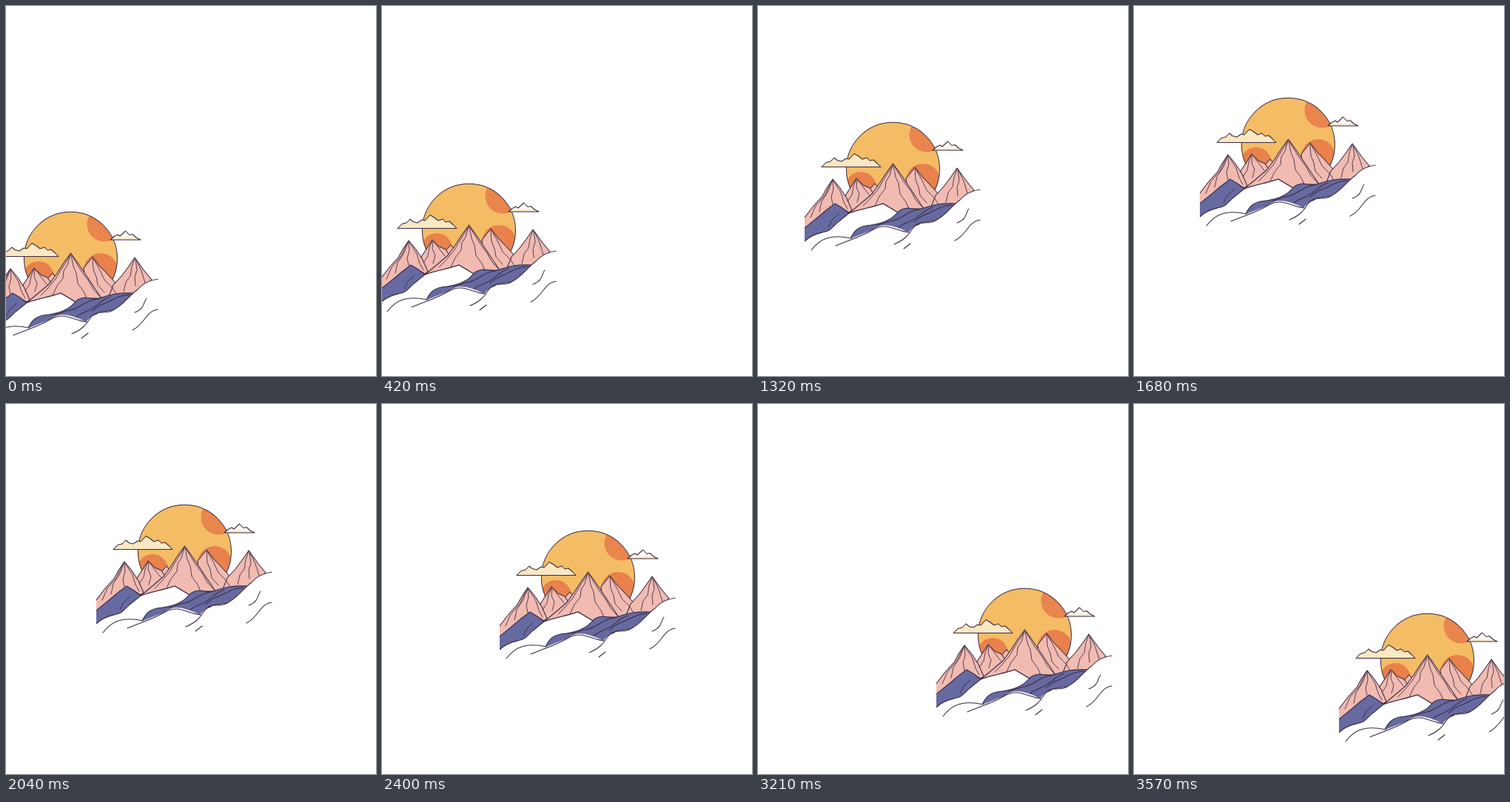
An HTML page that plays this animation: 500 px wide and 500 px high, repeating every 3600 ms.

```html
<!DOCTYPE html>
<html lang="en">
<head>
<meta charset="utf-8">
<title>Mountain sunrise</title>
<style>
  html, body { margin: 0; height: 100%; overflow: hidden; background: #fff; }
  svg { display: block; width: 100vw; height: 100vh; }
  .ink { fill: none; stroke: #3b2a42; stroke-width: 1.05; stroke-linejoin: round; stroke-linecap: round; }
  .thin { stroke-width: .85; }
  .pink { fill: #f1bbb1; }
  .blue { fill: #666aa0; stroke: #352d50; }
  .snow { fill: #fff; }
  .cream { fill: #f9e8c2; }
  .mist { fill: url(#mist); }
  .spot { fill: #e8814b; }
</style>
</head>
<body>
<svg viewBox="0 0 500 500">
  <defs>
    <clipPath id="frame"><path d="M89 120H326.5V300H89Z"/></clipPath>
    <clipPath id="disc"><circle cx="208.4" cy="187.3" r="63"/></clipPath>
    <pattern id="grain" width="4" height="4" patternUnits="userSpaceOnUse">
      <path d="M0 0h1v1h-1zM2 2h1v1h-1z" fill="#f3b168" opacity=".7"/>
    </pattern>
    <linearGradient id="mist" x2="0" y2="1">
      <stop offset=".45" stop-color="#fff"/><stop offset="1" stop-color="#f9e5bd"/>
    </linearGradient>
  </defs>
  <g id="scene"><g clip-path="url(#frame)">
    <!-- sun -->
    <circle cx="208.4" cy="187.3" r="63" fill="#f4bc65"/>
    <g clip-path="url(#disc)" class="spot">
      <circle cx="254" cy="141" r="23.5"/>
      <circle cx="254" cy="141" r="23.5" fill="url(#grain)"/>
      <circle cx="249" cy="203" r="23"/>
      <circle cx="165" cy="212" r="21"/>
    </g>
    <circle cx="208.4" cy="187.3" r="63" class="ink"/>

    <!-- clouds -->
    <path class="ink cream" d="M112 184.5L118 178.5 124 177 129 172 133 175.5 139 177 145 173 149 174 156 166.5 162 170 167 174 173 172 177 176 182 175 187 179.5 192 184.5Z"/>
    <path class="ink mist" d="M262 162L267 157.5 272 155 275 157 282.5 150 288 155.5 292 154.5 297 159 303 162Z"/>

    <!-- peaks, back to front -->
    <g class="ink pink">
      <path d="M184 207L170 222 160 250H200L190 214Z"/>
      <path d="M159 200L152 211 144 223 146 246H176L183 222 177 213 168 209Z"/>
      <path d="M238 185L226 200 230 241H278L275 228 267 218 255 205 248 198Z"/>
      <path d="M295 186L286 199 277 211 266 223 260 238H293L318 216 308 204Z"/>
      <path d="M127 201L119 213 113 224 102 236 95 245 85 258V271L130 235 149 246 153 243 146 227 137 213Z"/>
      <path d="M208.5 180L199 193 190 207 180 221 166 233 149 247 195 234 215 246 226 241H250L242 229 230 211 220 196Z"/>
    </g>
    <g class="ink thin">
      <path d="M127 202L121 217 112 231 109 245M125 204L117 222 104 237 97 253M127 202L128 214 125 225 127 235M128 203L138 219 142 232 147 241"/>
      <path d="M159 201L155 211 153 222 147 231M160 202L159 212 163 221 160 232M161 202L169 213 176 222"/>
      <path d="M208 182L204 196 199 204 198 214 190 224 184 237M207 184L195 203 188 215 177 228 168 237M209 182L212 198 216 207 218 221 226 232 230 241M210 183L222 203 233 218 239 229 249 240"/>
      <path d="M238 187L239 202 243 212 245 223 254 233M239 187L248 203 254 216 264 226 270 235"/>
      <path d="M295 187L291 198 289 211 283 219 280 232M296 188L298 203 295 212 296 224M297 189L304 204 309 220"/>
    </g>

    <!-- blue slopes and snow -->
    <path class="snow" d="M149 247L195 234 215 246 212 262 150 285 89 290Z"/>
    <path class="ink" d="M149 247C160 242 182 239 195 234L215 246"/>
    <path class="ink blue" d="M85 270L105 254 118 243 130 234 140 240 149 247 133 260C125 268 122 272 112 273Q99 276 85 288Z"/>
    <path class="ink thin" d="M135 248L126 256 121 266"/>
    <path class="ink blue" d="M151 281C156 271 161 266 171 264C184 263 194 261 204 255C214 250 214 241 228 240L243 242C256 239 263 233 293 234L276 255 246 260 230 273Z"/>
    <path class="ink" d="M244 242C229 243 222 254 208 257Q195 260 187 264M262 239C248 243 244 254 229 259Q221 262 216 266M288 236C271 237 263 245 254 248Q245 251 237 259"/>
    <path class="snow" d="M89 286Q98 275 120 274L152 281 182 269Q196 256 229 273C241 258 253 264 264 258C281 250 285 239 299 229Q309 217 327 215V300H89Z"/>
    <path class="ink" d="M89 285Q98 276 113 273M98 297C110 281 125 275 152 281M131 291C150 283 165 279 180 270C200 258 211 271 230 273M210 289C224 283 229 277 234 269C243 255 253 263 264 258C281 250 285 239 299 229Q309 217 327 215"/>
    <path class="ink" d="M232 288L223 295M311 241C306 246 310 254 295 260M327 256C309 258 310 275 292 284"/>
  </g></g>
</svg>
<script>
  const scene = document.getElementById("scene");
  const LOOP = 3600, STEP = 30;
  const stops = [[-121, 154], [9, -11], [191, 162]];

  function draw() {
    const time = Math.floor(performance.now() % LOOP / STEP) * STEP;
    const progress = time / LOOP * 2;
    const leg = Math.floor(progress);
    const [x, y] = stops[leg].map((from, axis) =>
      Math.round(from + (stops[leg + 1][axis] - from) * (progress - leg)));
    scene.setAttribute("transform", `translate(${x} ${y})`);
    requestAnimationFrame(draw);
  }
  draw();
</script>
</body>
</html>
```
